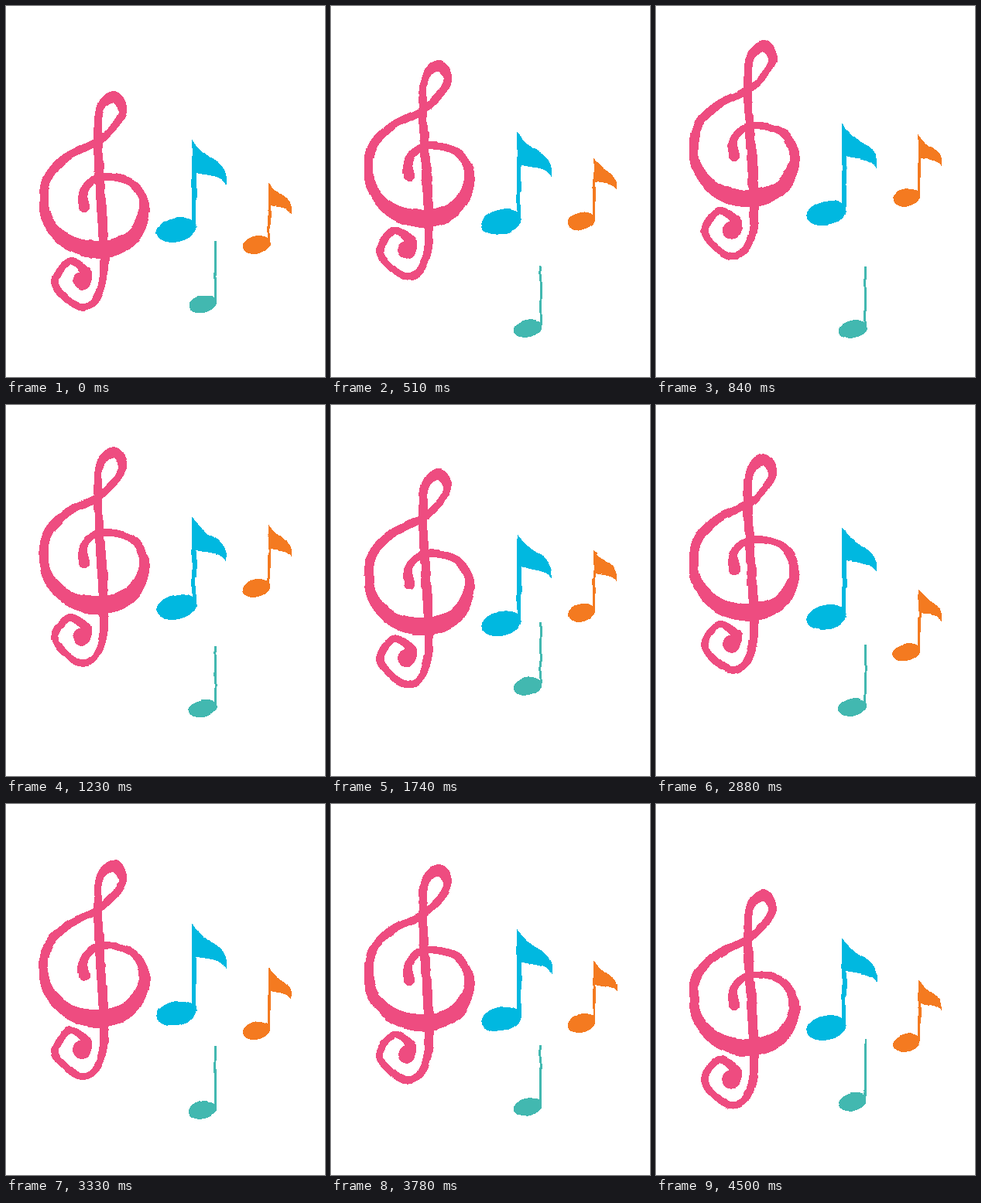
Write an HTML page that moves like this. It is 412 by 480 pixels and loops after 4530 ms.

```html
<!DOCTYPE html>
<html lang="en">
<head>
<meta charset="utf-8">
<title>Dancing notes</title>
<style>
  html, body { margin: 0; width: 100%; height: 100%; overflow: hidden; background: #fff; }
  svg { display: block; width: 100%; height: 100%; }
</style>
</head>
<body>
<svg viewBox="0 0 412 480" shape-rendering="crispEdges">
  <filter id="rough" filterUnits="userSpaceOnUse" x="0" y="0" width="412" height="480" color-interpolation-filters="sRGB">
    <feTurbulence id="noise" type="fractalNoise" baseFrequency="0.05" numOctaves="1" result="n"/>
    <feDisplacementMap in="SourceGraphic" in2="n" scale="4" xChannelSelector="R" yChannelSelector="G"/>
  </filter>
  <g filter="url(#rough)">
    <rect width="412" height="480" fill="#fff"/>
    <g id="clef" fill="#ee4c80"></g>
    <g id="blue" fill="#00b8e0">
      <path d="M240 173C249 186 257 192 265 197C279 204 287 214 285 232C278 218 262 220 246 216L245 288L240.500 282Z"/>
      <ellipse cx="220" cy="289.500" rx="26" ry="15.800" transform="rotate(-12 220 289.500)"/>
    </g>
    <g id="orange" fill="#f47a20">
      <path d="M339 227C346 237 352 241 358 245C366 250 371 257 369.500 269C363 259 352 261 342 258L341 308L338 303Z"/>
      <ellipse cx="323.500" cy="309" rx="17.800" ry="11.600" transform="rotate(-13 323.500 309)"/>
    </g>
    <g id="teal" fill="#42b8b0">
      <path d="M269 304H272.300V385H269Z"/>
      <ellipse cx="254" cy="385.500" rx="18.500" ry="11.300" transform="rotate(-13 254 385.500)"/>
    </g>
  </g>
</svg>
<script>
const LOOP = 4530, STEP = 30;
const $ = id => document.getElementById(id);

// Key points of the clef's centre line
const spine = [
  [101, 260], [100, 240], [113, 225], [135, 221], [165, 231], [179, 262], [163, 299],
  [125, 315], [81, 306], [52, 273], [52, 226], [79, 195], [123, 172], [150, 139],
  [140, 118], [122, 132], [118.5, 172], [121.5, 232], [125.5, 296], [126, 350],
  [114, 383], [91, 388], [63, 359], [81, 331], [103, 344], [98, 356]
];
const end = spine.length - 1;

// Where the stroke swells: key point, extra half width, reach
const swells = [[0, 2.5, 0.8], [7, 6.7, 1.8], [10.5, 1, 1], [14, 3, 0.8], [17.5, 1.6, 1.5], [end, 7, 0.9]];

// Vertical travel: turning points as time, offset
const moves = {
  clef: [[906, -67], [1812, -28], [2718, -48], [3624, -34.5]],
  blue: [[1230, -28], [2050, 3], [3200, -19]],
  orange: [[1140, -73], [2600, 18], [3670, -26]],
  teal: [[660, 36], [1800, -22], [3250, 10.5]]
};

const halfWidth = s => swells.reduce((w, [c, h, r]) => w + h * Math.exp(-(((s - c) / r) ** 2)), 4.7);

// Catmull-Rom curve through the key points
function point(s) {
  const i = Math.min(Math.floor(s), end - 1), u = s - i;
  const [a, b, c, d] = [-1, 0, 1, 2].map(k => spine[Math.max(0, Math.min(end, i + k))]);
  return b.map((v, j) => v + 0.5 * u * (c[j] - a[j] +
    u * (2 * a[j] - 5 * v + 4 * c[j] - d[j] + u * (3 * (v - c[j]) + d[j] - a[j]))));
}

function drawClef() {
  const left = [], right = [], n = 10;
  for (let k = 0; k <= end * n; k++) {
    const s = k / n, [x, y] = point(s);
    const [ax, ay] = point(Math.max(0, s - 0.05)), [bx, by] = point(Math.min(end, s + 0.05));
    const dx = bx - ax, dy = by - ay, f = halfWidth(s) / Math.hypot(dx, dy);
    left.push([x - dy * f, y + dx * f]);
    right.unshift([x + dy * f, y - dx * f]);
  }
  const edge = left.concat(right).map(p => p.map(v => v.toFixed(1)).join(" "));
  const dot = s => `<circle cx="${spine[s][0]}" cy="${spine[s][1]}" r="${halfWidth(s)}"/>`;
  $("clef").innerHTML = `<path d="M${edge.join("L")}Z"/>` + dot(0) + dot(end);
}

function offset(turns, t) {
  const keys = [[0, 0], ...turns, [LOOP, 0]];
  const i = keys.findIndex(k => k[0] > t);
  const [t0, y0] = keys[i - 1], [t1, y1] = keys[i];
  return y0 + (y1 - y0) * (1 - Math.cos(Math.PI * (t - t0) / (t1 - t0))) / 2;
}

const start = performance.now();
let shown = -1;

function draw() {
  const step = Math.floor((performance.now() - start) % LOOP / STEP);
  if (step !== shown) {
    shown = step;
    for (const id in moves) {
      $(id).setAttribute("transform", `translate(0 ${offset(moves[id], step * STEP).toFixed(2)})`);
    }
    $("noise").setAttribute("seed", step + 1);
  }
  requestAnimationFrame(draw);
}

drawClef();
draw();
</script>
</body>
</html>
```
